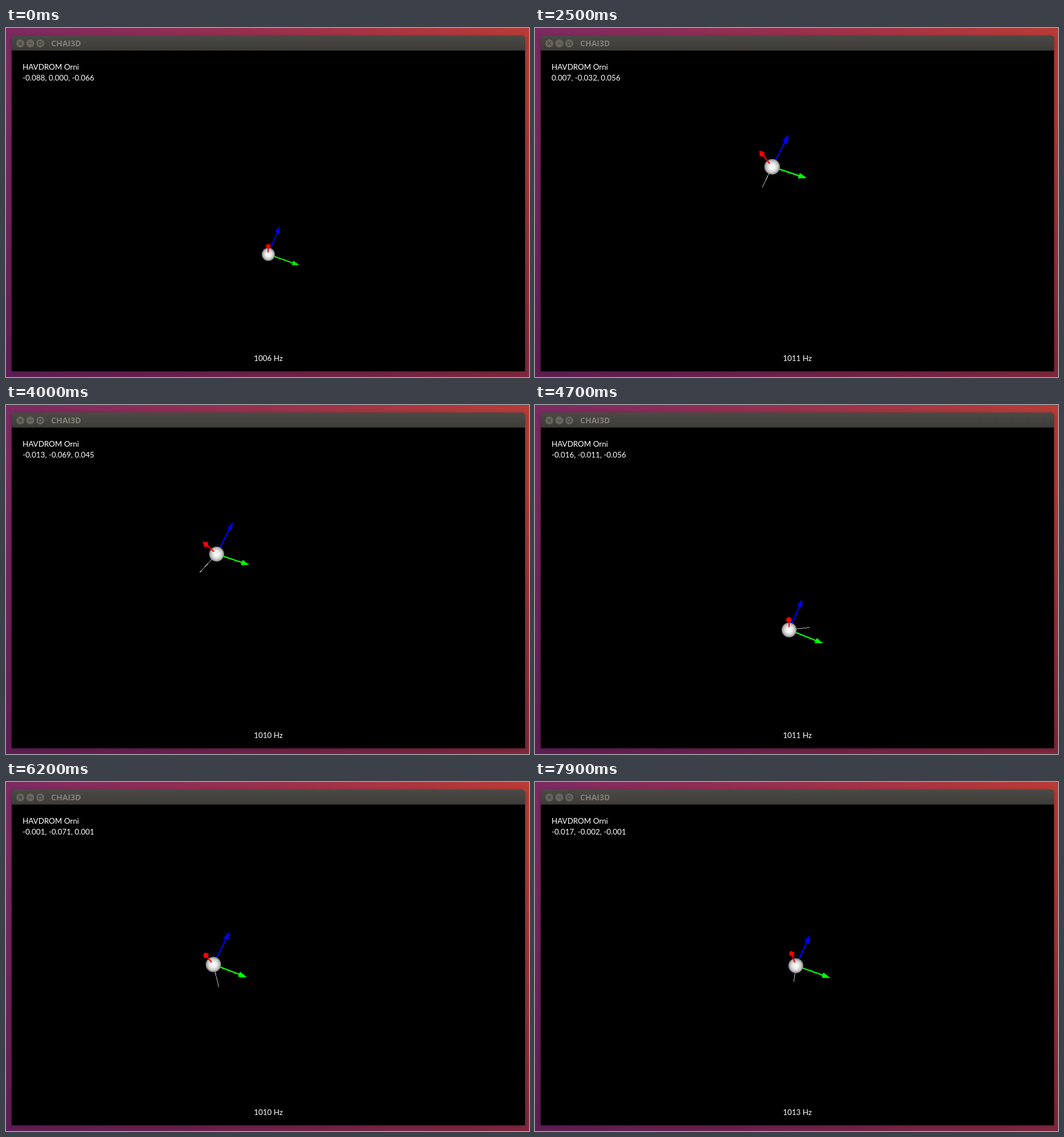
Animation of 916 by 611 pixels, one loop 8 s. Source, as an HTML page:

```html
<!DOCTYPE html>
<html lang="en">
<head>
<meta charset="utf-8">
<title>CHAI3D</title>
<style>
  html, body { margin: 0; width: 100%; height: 100%; overflow: hidden; background: #000; }
  svg { display: block; width: 916px; height: 611px; }
  .label { font: 13.4px Lato, sans-serif; fill: #fff; }
  .title { font: bold 14px "Open Sans", sans-serif; fill: #827f78; }
</style>
</head>
<body>
<svg viewBox="0 0 916 611">
  <defs>
    <linearGradient id="desk">
      <stop offset="0" stop-color="#7c2a62"/><stop offset=".45" stop-color="#96304f"/>
      <stop offset="1" stop-color="#b93b36"/>
    </linearGradient>
    <linearGradient id="dusk" x2="0" y2="1">
      <stop offset=".2" stop-color="#3c0f46" stop-opacity="0"/>
      <stop offset="1" stop-color="#3c0f46" stop-opacity=".45"/>
    </linearGradient>
    <linearGradient id="bar" x2="0" y2="1">
      <stop offset="0" stop-color="#4b4a45"/><stop offset="1" stop-color="#3c3b37"/>
    </linearGradient>
    <radialGradient id="shade">
      <stop offset="0" stop-color="#fff"/><stop offset=".35" stop-color="#f4f4f4"/>
      <stop offset=".75" stop-color="#c4c4c4"/><stop offset="1" stop-color="#777"/>
    </radialGradient>
    <filter id="shadow"><feGaussianBlur stdDeviation="4"/></filter>
  </defs>
  <rect width="916" height="611" fill="url(#desk)"/>
  <rect width="916" height="611" fill="url(#dusk)"/>
  <rect x="10" y="16" width="899" height="585" opacity=".3" filter="url(#shadow)"/>
  <path d="M10 40V19q0-6 6-6H903q6 0 6 6V40Z" fill="url(#bar)"/>
  <g fill="#66645d">
    <circle cx="25" cy="27" r="7"/><circle cx="42.5" cy="27" r="7"/><circle cx="60" cy="27" r="7"/>
  </g>
  <path d="M22.5 24.5l5 5m0-5l-5 5M39.5 27h6M57.5 24.5h5v5h-5z" fill="none" stroke="#3c3b37" stroke-width="1.2"/>
  <text class="title" x="79" y="32">CHAI3D</text>
  <rect x="10" y="39.5" width="899" height="561.5"/>
  <g shape-rendering="crispEdges">
    <line id="heading" stroke="#bdbdbd"/>
    <g id="blue" fill="#00f" stroke="#00f"></g>
    <circle id="ball" fill="url(#shade)" shape-rendering="auto"/>
    <g id="green" fill="#0f0" stroke="#0f0"></g>
    <g id="red" fill="#f00" stroke="#f00"></g>
  </g>
  <text class="label" x="29" y="73">HAVDROM Orni</text>
  <text class="label" id="position" x="29" y="92"></text>
  <text class="label" id="rate" x="459.5" y="583" text-anchor="middle"></text>
</svg>
<script>
const LOOP = 8000, STEP = 100, REST = 950;
const CENTER = [459.5, 320.3], FOCAL = 677, CAMERA = 0.5;
const BALL = 0.01, AXIS = 0.05, HEAD = 0.0035, SHAFT = 0.0017;
const RATES = [1006, 1013, 1011, 1009, 1010, 1011, 1010, 1012, 1013];

const el = id => document.getElementById(id);
const set = (node, attrs) => {
  for (const name in attrs) node.setAttribute(name, attrs[name]);
};
const mix = (a, b, u) => a + (b - a) * u;

// The hand draws circles: a point it passes (mm), with the circle's radius
// and the angle (degrees) reached on it.
function key(time, depth, right, up, radius, angle) {
  const turn = angle * Math.PI / 180;
  return { time, depth, radius, turn,
    cx: right - radius * Math.cos(turn), cy: up - radius * Math.sin(turn) };
}
const KEYS = [
  key(REST, -88, 0, -66, 0, -130),
  key(1700, 25, 107, 17.4, 55, -49),
  key(3300, -11, 38, -0.3, 65, 358),
  key(4700, -16, -11, -56, 60, 637),
  key(5150, -3, 98, 5, 65, 715),
  key(5600, 6, 29, 80, 65, 773),
  key(6900, -9, 20, -6, 45, 1077),
  key(7900, -17, -2, -1, 10, 1253)
];

function motion(t) {
  const next = Math.max(1, KEYS.findIndex(k => k.time >= t));
  const a = KEYS[next - 1], b = KEYS[next];
  const u = Math.max(0, (t - a.time) / (b.time - a.time));
  const at = name => mix(a[name], b[name], u);
  const turn = at("turn"), radius = at("radius");
  const right = at("cx") + radius * Math.cos(turn);
  const up = at("cy") + radius * Math.sin(turn);
  return { pos: [at("depth"), right, up].map(mm => mm / 1000), turn };
}

function project([depth, right, up]) {
  const scale = FOCAL / (CAMERA - depth);
  return { x: CENTER[0] + right * scale, y: CENTER[1] - up * scale, scale };
}

// Shaft plus a cone whose round base is foreshortened by the axis tilt.
function drawArrow(id, at, dx, dy) {
  const len = Math.hypot(dx, dy), tip = len * AXIS * at.scale;
  const r = HEAD * at.scale, depth = Math.sqrt(Math.max(0, 1 - len * len));
  const base = tip * 0.79, angle = Math.atan2(dy, dx) * 180 / Math.PI;
  const node = el(id);
  set(node, { transform: `translate(${at.x} ${at.y}) rotate(${angle})` });
  node.innerHTML =
    `<line x1="${tip * 0.2}" x2="${base}" stroke-width="${at.scale * SHAFT}"/>` +
    `<ellipse cx="${base}" rx="${r * depth}" ry="${r}" stroke="none"/>` +
    `<path d="M${base} ${-r}L${tip} 0L${base} ${r}Z" stroke="none"/>`;
}

// The wrist leans with the position of the hand.
function drawAxes(at, [d, x, y]) {
  drawArrow("red", at, -0.13 + 0.5 * d + 1.6 * x - 2.6 * y, -0.42 - 0.65 * d - 1.7 * x - 0.8 * y);
  drawArrow("green", at, 0.915 - 0.3 * d + 0.72 * x, 0.33 + 0.5 * d - 0.7 * y);
  drawArrow("blue", at, 0.38 - 0.5 * x + 0.5 * y, -0.81 + 0.65 * d + 0.5 * x);
}

function render(time) {
  const t = Math.floor(time % LOOP / STEP) * STEP;
  const { pos, turn } = motion(t);
  const [depth, right, up] = pos;
  const at = project(pos);
  // Faster, so a longer line, away from the middle.
  const reach = t < REST ? 0 : 0.022 + 1.6 * (right * right + up * up);
  const end = project([depth, right - reach * Math.sin(turn), up + reach * Math.cos(turn)]);

  set(el("ball"), { cx: at.x, cy: at.y, r: BALL * at.scale });
  set(el("heading"), { x1: at.x, y1: at.y, x2: end.x, y2: end.y });
  drawAxes(at, pos);

  el("position").textContent = pos.map(p => p.toFixed(3)).join(", ");
  el("rate").textContent = RATES[Math.floor(t / 910)] + " Hz";
}

const start = performance.now();
function tick() {
  render(performance.now() - start);
  requestAnimationFrame(tick);
}
tick();
</script>
</body>
</html>
```
